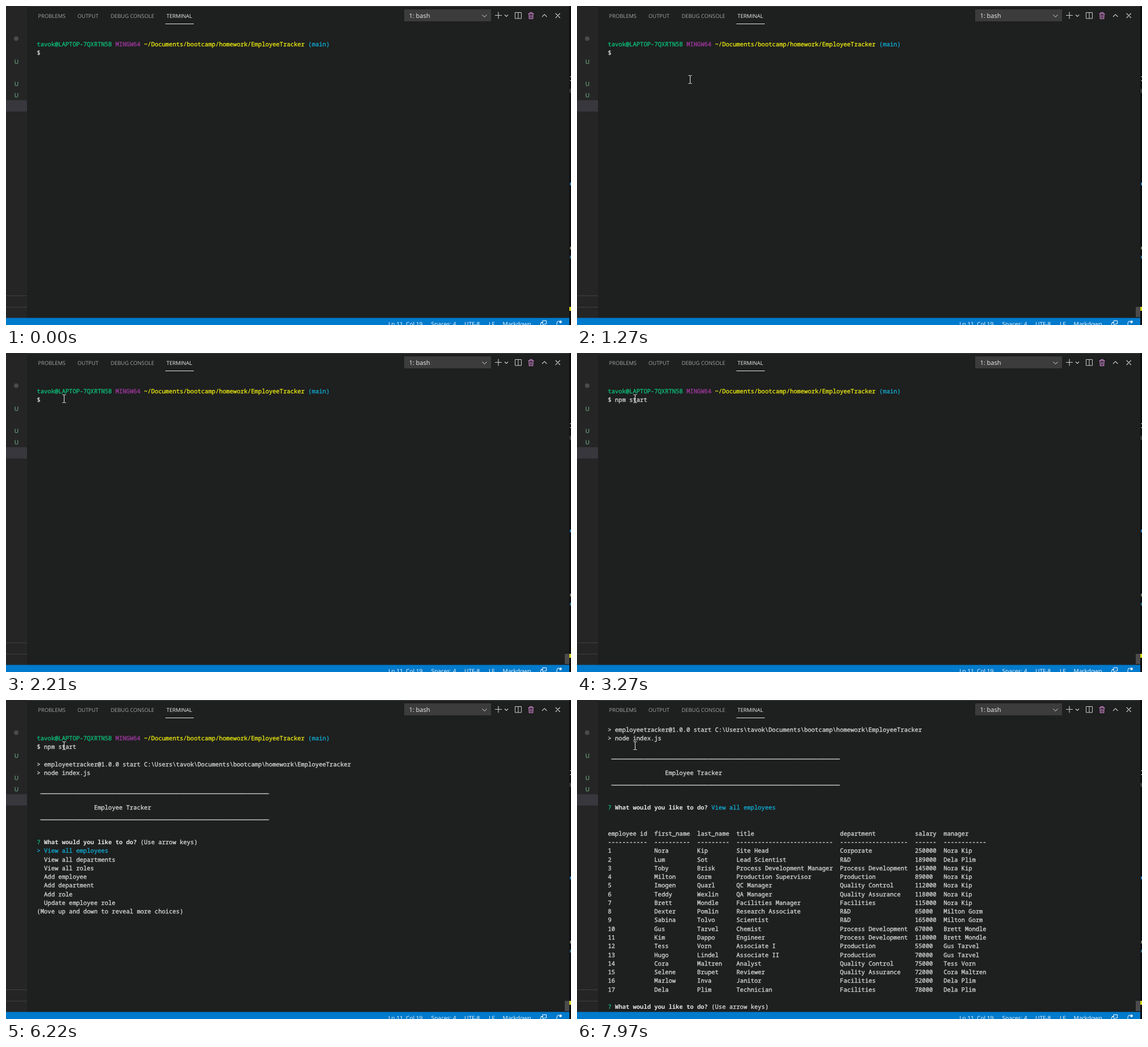
An HTML page with a canvas that plays this animation: 996 by 562 pixels, repeating every 8 s.

```html
<!DOCTYPE html>
<html lang="en">
<head>
<meta charset="utf-8">
<title>Terminal session</title>
<style>
  html, body { margin: 0; width: 100%; height: 100%; overflow: hidden; background: #1e1e1e; }
  canvas { display: block; }
</style>
</head>
<body>
<canvas id="stage" width="996" height="562"></canvas>
<script>
const ctx = document.getElementById('stage').getContext('2d');
const LOOP = 8000;
const UI = '"Open Sans", sans-serif';
const MONO = '10.49px "Noto Sans Mono", monospace';
const CELL = 6.294, ROW = 15.27, LEFT = 54.5, BASE = 70.8;
const FG = '#d2d2d2', CYAN = '#11a8cd', GREEN = '#0dbc79';

const employees = `Nora|Kip|Site Head|Corporate|250000|Nora Kip
Lum|Sot|Lead Scientist|R&D|189000|Dela Plim
Toby|Brisk|Process Development Manager|Process Development|145000|Nora Kip
Milton|Gorm|Production Supervisor|Production|89000|Nora Kip
Imogen|Quarl|QC Manager|Quality Control|112000|Nora Kip
Teddy|Wexlin|QA Manager|Quality Assurance|118000|Nora Kip
Brett|Mondle|Facilities Manager|Facilities|115000|Nora Kip
Dexter|Pomlin|Research Associate|R&D|65000|Milton Gorm
Sabina|Tolvo|Scientist|R&D|165000|Milton Gorm
Gus|Tarvel|Chemist|Process Development|67000|Brett Mondle
Kim|Dappo|Engineer|Process Development|110000|Brett Mondle
Tess|Vorn|Associate I|Production|55000|Gus Tarvel
Hugo|Lindel|Associate II|Production|70000|Gus Tarvel
Cora|Maltren|Analyst|Quality Control|75000|Tess Vorn
Selene|Brupet|Reviewer|Quality Assurance|72000|Cora Maltren
Marlow|Inva|Janitor|Facilities|52000|Dela Plim
Dela|Plim|Technician|Facilities|78000|Dela Plim`.split('\n').map((line, i) => [String(i + 1), ...line.split('|')]);
const headers = ['employee id', 'first_name', 'last_name', 'title', 'department', 'salary', 'manager'];
const widths = [11, 10, 9, 27, 19, 6, 12];
const menu = ['View all employees', 'View all departments', 'View all roles', 'Add employee',
  'Add department', 'Add role', 'Update employee role'];

// Pointer keys: time, x, y
const pointer = [
  [230, 600, 560], [340, 494, 330], [520, 494, 330], [690, 361.5, 259.5], [800, 319.5, 188],
  [1000, 319.5, 188], [1320, 177.5, 119], [1550, 177.5, 119], [1830, 103.5, 79.5],
  [2030, 97, 77], [2209, 97, 77], [2210, 102.5, 80.5]
];

function rect(x, y, w, h, color) {
  ctx.fillStyle = color;
  ctx.fillRect(x, y, w, h);
}
function text(str, x, y, color, font, thicken = 0) {
  ctx.font = font;
  ctx.fillStyle = ctx.strokeStyle = color;
  ctx.fillText(str, x, y);
  if (!thicken) return;
  ctx.lineWidth = thicken;
  ctx.strokeText(str, x, y);
}
function stroke(path, color, width = 1) {
  ctx.strokeStyle = color;
  ctx.lineWidth = width;
  ctx.stroke(new Path2D(path));
}

function drawSidebar() {
  rect(0, 0, 37, 550, '#252526');
  rect(0, 166, 37, 20, '#37373d');
  rect(0, 510, 37, 1, '#414142');
  rect(0, 530, 37, 1, '#414142');
  ctx.fillStyle = '#4b4b4c';
  ctx.beginPath();
  ctx.arc(18, 57.5, 4, 0, 7);
  ctx.fill();
  for (const y of [101.5, 141, 161]) text('U', 14.5, y, '#649a74', '600 10.5px ' + UI);
}

function drawHeader() {
  rect(37, 0, 956, 1, '#414141');
  const tabs = [['PROBLEMS', 56.5], ['OUTPUT', 126], ['DEBUG CONSOLE', 184.5], ['TERMINAL', 283]];
  for (const [name, x] of tabs) text(name, x, 20.5, name === 'TERMINAL' ? '#f0f0f0' : '#a4a4a4', '9.4px ' + UI);
  rect(281, 31, 50, 1, '#e7e7e7');
  rect(702, 6, 153, 21, '#3c3c3c');
  text('1: bash', 710.5, 21, '#f0f0f0', '11px ' + UI);
  stroke('M839.5 15.5l4 4 4-4', '#ddd');
  stroke('M862 16.5h12M868 10.5v12M879 15.5l3 3 3-3', '#ccc', 1.1);
  stroke('M897.5 11.5h11v10.5h-11zM903 11.5v10.5', '#ccc');
  stroke('M920.5 13.5h10M923.5 13v-1.5h4v1.5M921.8 14l.5 8.5h6.4l.5-8.5M924.3 15.5v5.5M926.8 15.5v5.5', '#d58ad5', 1.1);
  stroke('M945 19l4.2-4.2 4.2 4.2M968.7 13l8 8m0-8l-8 8', '#ccc', 1.1);
}

function drawEdges() {
  rect(993, 0, 3, 562, '#0c0d10');
  rect(994, 124, 2, 1, '#ccc');
  rect(994, 131, 2, 1, '#ccc');
  rect(994, 146, 1, 7, '#777');
  rect(994, 311, 2, 5, '#287bbf');
  rect(994, 424, 2, 5, '#77775c');
  rect(994, 440, 2, 5, '#2b6c88');
  rect(993, 530, 3, 7, '#d8d21c');
  rect(0, 549.5, 993, 12.5, '#007acc');
  const status = [['Ln 11, Col 19', 674], ['Spaces: 4', 749.5], ['UTF-8', 808], ['LF', 851], ['Markdown', 875.5]];
  for (const [label, x] of status) text(label, x, 563.5, '#fff', '10.2px ' + UI);
  stroke('M946 558v-3.5h6.5v5.5h-3l-2 2M943 557.5h4M942.5 562v-2a2 2 0 0 1 4 0v2', '#fff');
  stroke('M971 562v-3a4 4 0 0 1 4-4', '#fff');
  ctx.fillStyle = '#fff';
  ctx.beginPath();
  ctx.arc(977.5, 556.5, 2.2, 0, 7);
  ctx.fill();
}

function drawTerminal(t) {
  const finished = t >= 7970;
  const scroll = finished ? 4 : 0;
  const put = (row, col, str, color = FG, weight = '') => {
    const y = BASE + (row - scroll) * ROW;
    text(str, LEFT + col * CELL, y, color, weight + MONO, weight ? 0 : .35);
  };
  const ask = (row, answer, color) => {
    put(row, 0, '?', GREEN);
    put(row, 2, 'What would you like to do?', '#e5e5e5', 'bold ');
    put(row, 29, answer, color);
  };

  if (!finished) {
    put(0, 0, 'tavok@LAPTOP-7QXRTN5B', GREEN);
    put(0, 22, 'MINGW64', '#9c389c');
    put(0, 30, '~/Documents/bootcamp/homework/EmployeeTracker', '#e5e510');
    put(0, 76, '(main)', CYAN);
    put(1, 0, t >= 3270 ? '$ npm start' : '$');
  }
  if (t >= 5550) {
    put(3, 0, '> employeetracker@1.0.0 start C:\\Users\\tavok\\Documents\\bootcamp\\homework\\EmployeeTracker');
    put(4, 0, '> node index.js');
  }
  if (t >= 6140) {
    // Rules sit slightly below the text baseline
    put(6.1, 1, '_'.repeat(64));
    put(8, 16, 'Employee Tracker');
    put(9.1, 1, '_'.repeat(64));
  }
  if (t >= 6220 && t < 7910) {
    ask(12, '(Use arrow keys)');
    menu.forEach((item, i) => put(13 + i, 0, (i ? '  ' : '> ') + item, i ? FG : CYAN));
    put(20, 0, '(Move up and down to reveal more choices)');
  }
  if (finished) {
    ask(12, 'View all employees', CYAN);
    [headers, widths.map(w => '-'.repeat(w)), ...employees].forEach((cells, i) => {
      let col = 0;
      cells.forEach((cell, j) => {
        put(15 + i, col, cell);
        col += widths[j] + 2;
      });
    });
    ask(35, '(Use arrow keys)');
  }
}

function drawPointer(t) {
  if (t < pointer[0][0]) return;
  const next = pointer.findIndex(key => key[0] > t);
  const b = pointer[next < 0 ? pointer.length - 1 : next];
  const a = next < 0 ? b : pointer[next - 1];
  const k = a === b ? 0 : (t - a[0]) / (b[0] - a[0]);
  const x = Math.round(a[1] + (b[1] - a[1]) * k - .5) + .5;
  const y = Math.round(a[2] + (b[2] - a[2]) * k - .5) + .5;
  stroke(`M${x - 3} ${y - 7}h2.3l.7.7.7-.7h2.3M${x} ${y - 6.5}v13M${x - 3} ${y + 7}h2.3l.7-.7.7.7h2.3`, '#f2f2f2');
}

function draw(now) {
  const t = now % LOOP;
  ctx.textRendering = 'geometricPrecision';
  ctx.lineJoin = 'round';
  rect(0, 0, 996, 562, '#1e1f1f');
  drawSidebar();
  drawHeader();
  drawEdges();
  drawTerminal(t);
  if (t >= 260) rect(985, 530, 8, 18, '#4b4b4b');
  drawPointer(t);
}

const start = performance.now();
function tick() {
  draw(performance.now() - start);
  requestAnimationFrame(tick);
}
tick();
</script>
</body>
</html>
```
